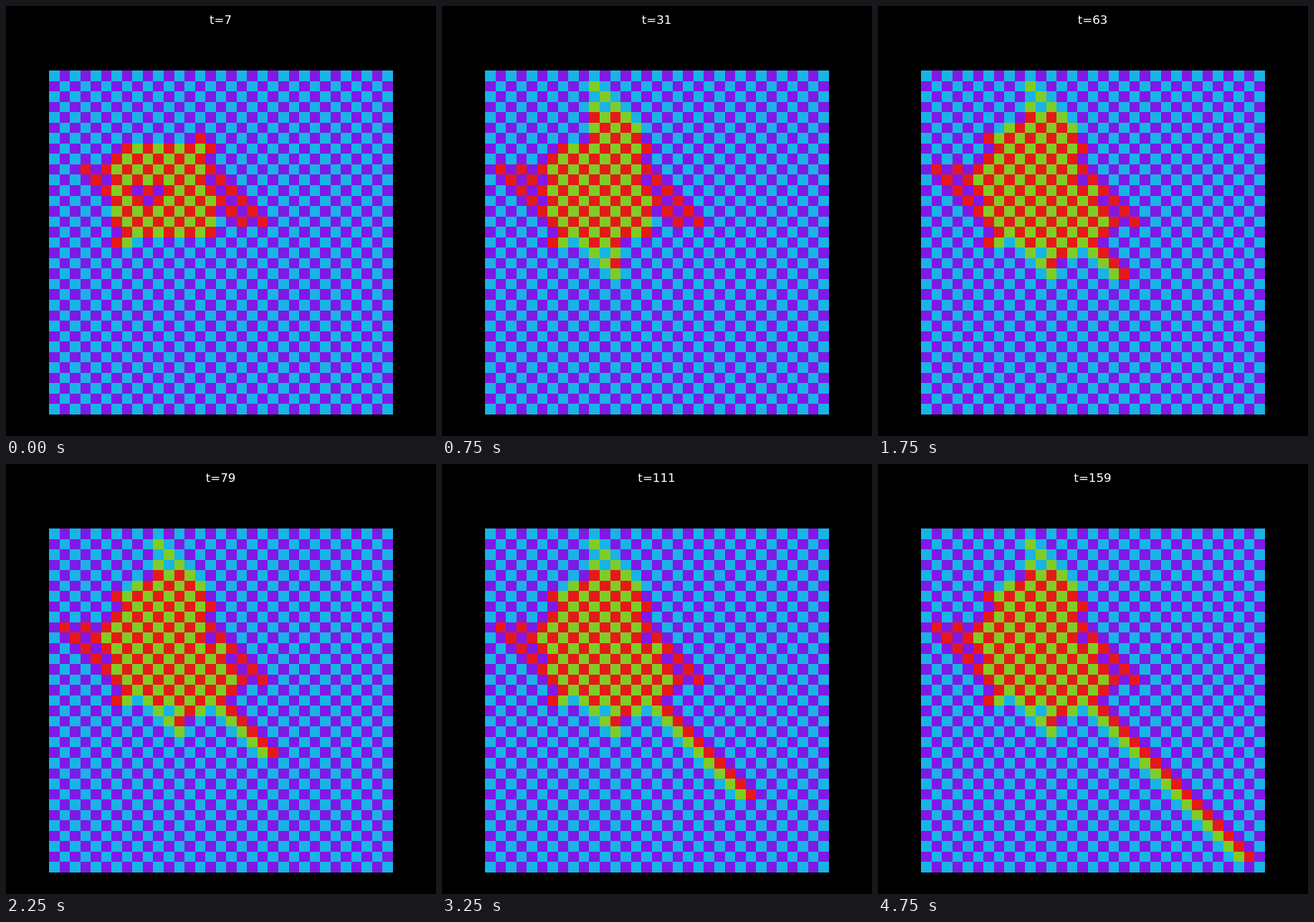
Animation, 600 px wide and 600 px high, one loop 5 s. Source, as an HTML page with a canvas:

```html
<!DOCTYPE html>
<html lang="en">
<head>
<meta charset="utf-8">
<title>Cell growth</title>
<style>
  html, body { margin: 0; width: 100%; height: 100%; overflow: hidden; background: #000; }
  canvas, svg { position: absolute; left: 0; top: 0; width: 600px; height: 600px; }
  text { font: 16.667px "DejaVu Sans", sans-serif; fill: #fff; text-anchor: middle; }
</style>
</head>
<body>
<canvas id="board" width="600" height="600"></canvas>
<svg viewBox="0 0 600 600"><text id="label" x="299.5" y="25"></text></svg>
<script>
const SIZE = 33, STEPS = 20, STEP_MS = 250;
const LEFT = 60, TOP = 90, CELL = 480 / SIZE;
const IDLE = ['#19b3e6', '#8019e6'];
const ACTIVE = ['#e61919', '#80cc26'];
const { min, max, abs } = Math;

// Diagonal arms around the body: column, row, length, step of appearance.
const ARMS = [
  [1, 9, 5, 2], [3, 9, 3, 0], [5, 9, 1, 0], [5, 10, 1, 4],
  [10, 1, 3, 3], [10, 3, 2, 3], [14, 6, 2, 0],
  [14, 10, 5, 0], [15, 9, 6, 0], [16, 11, 1, 6],
  [10, 17, 3, 1], [12, 18, 1, 3], [6, 16, 1, 0], [7, 16, 1, 0]
];

// The body is a tilted block bounded by straight lines.
function inBody(col, row) {
  const from = row < 7 ? 18 - 2 * row : max(6, 14 - row, row - 8, 3 * row - 39);
  const to = min(row + 9, max(14, row + 4), 32 - row, 48 - 2 * row);
  return row > 3 && col >= from && col <= to;
}

// Its core is there from the start; the rims fill in later.
function bodyStep(col, row) {
  if (row < 7) return col < 10 ? 4 : 3;
  if (col > 15) return 5;
  if (row > 15) return col < 13 ? 1 : 4;
  const inNotch = row > 10 && row + abs(col - 9) === 12;
  return inNotch ? 1 : 0;
}

// The tail grows by one stair per step.
function tailStep(col, row) {
  const onStair = row === col || row === col + 1;
  return onStair && row > 16 && row < STEPS + 12 ? row - 12 : Infinity;
}

function armStep(col, row) {
  const hits = ARMS.filter(([x, y, length]) =>
    col - x === row - y && col >= x && col < x + length);
  return min(...hits.map(arm => arm[3]));
}

const birth = (col, row) => min(
  inBody(col, row) ? bodyStep(col, row) : Infinity,
  armStep(col, row),
  tailStep(col, row)
);

const edge = (start, i) => Math.round(start + i * CELL);
const cells = Array.from({ length: SIZE * SIZE }, (_, i) => {
  const col = i % SIZE, row = Math.floor(i / SIZE);
  const x = edge(LEFT, col), y = edge(TOP, row);
  return {
    x, y,
    w: edge(LEFT, col + 1) - x,
    h: edge(TOP, row + 1) - y,
    parity: (col + row) % 2,
    born: birth(col, row)
  };
});

const ctx = document.getElementById('board').getContext('2d');
const label = document.getElementById('label');

function draw(step) {
  for (const { x, y, w, h, parity, born } of cells) {
    ctx.fillStyle = (born <= step ? ACTIVE : IDLE)[parity];
    ctx.fillRect(x, y, w, h);
  }
  label.textContent = `t=${7 + 8 * step}`;
}

const start = performance.now();
let shown = -1;

function tick() {
  const step = Math.floor((performance.now() - start) / STEP_MS) % STEPS;
  if (step !== shown) draw(shown = step);
  requestAnimationFrame(tick);
}
tick();
</script>
</body>
</html>
```
